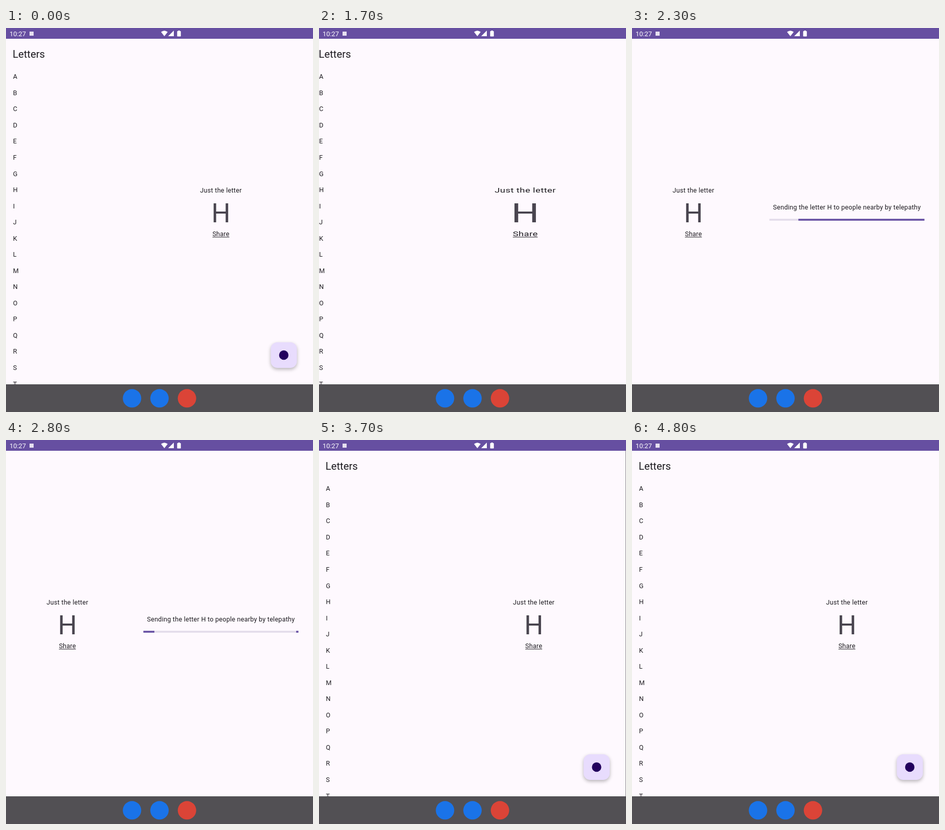
An HTML page with a canvas that plays this animation: 600x749 px, repeating every 4900 ms.

```html
<!DOCTYPE html>
<html lang="en">
<head>
<meta charset="utf-8">
<title>Letters</title>
<style>
  html, body { margin: 0; width: 100%; height: 100%; overflow: hidden; background: #fef9fe; }
  canvas { display: block; width: 600px; height: 749px; }
</style>
</head>
<body>
<canvas id="stage" width="600" height="749"></canvas>
<script>
const ctx = document.getElementById('stage').getContext('2d');

const W = 600, H = 749, TOP = 21, BOTTOM = 695;
const LIST_W = 240, DETAIL_W = 360;
const LOOP = 4900, OPEN = 1682, CLOSE = 3241;
const INK = '#1d1b20', PURPLE = '#6750a4', PAPER = '#fef9fe';
const BODY = 12.63;

// Critically damped spring: what is left of the way after ms.
function springLeft(ms) {
  const u = 20 * Math.max(0, ms) / 1000;
  return (1 + u) * Math.exp(-u);
}

function bezier(x1, y1, x2, y2) {
  const at = (a, b, s) => 3 * a * s * (1 - s) ** 2 + 3 * b * s * s * (1 - s) + s ** 3;
  return x => {
    if (x <= 0) return 0;
    if (x >= 1) return 1;
    let lo = 0, hi = 1;
    for (let i = 0; i < 24; i++) {
      const mid = (lo + hi) / 2;
      if (at(x1, x2, mid) < x) lo = mid; else hi = mid;
    }
    return at(y1, y2, lo);
  };
}

function rect(x, y, w, h, color) {
  ctx.fillStyle = color;
  ctx.fillRect(x, y, w, h);
}

function disc(x, y, r, color) {
  ctx.fillStyle = color;
  ctx.beginPath();
  ctx.arc(x, y, r, 0, 2 * Math.PI);
  ctx.fill();
}

function shape(points, color) {
  ctx.fillStyle = color;
  ctx.beginPath();
  points.forEach(([x, y]) => ctx.lineTo(x, y));
  ctx.fill();
}

function label(text, x, y, size, { color = INK, align = 'left', spacing = 0 } = {}) {
  ctx.font = `${size}px Roboto, sans-serif`;
  ctx.letterSpacing = spacing + 'px';
  ctx.textAlign = align;
  ctx.fillStyle = color;
  ctx.fillText(text, x, y);
}

function drawList(x) {
  label('Letters', x + 13, 58, 20.3);
  for (let i = 0; i < 20; i++) {
    label(String.fromCharCode(65 + i), x + 13.7, 99.3 + i * 31.54, BODY);
  }
}

function drawFab(x) {
  ctx.save();
  ctx.shadowColor = 'rgba(0, 0, 0, 0.28)';
  ctx.shadowBlur = 7;
  ctx.shadowOffsetY = 3;
  ctx.fillStyle = '#e8dcfd';
  ctx.beginPath();
  ctx.roundRect(x, 613, 51, 50, 13);
  ctx.fill();
  ctx.restore();
  disc(x + 25.4, 638, 9.2, '#22005d');
}

// Laid out at its final width, then squeezed to the width it has now.
function drawDetail(x, width, layoutWidth) {
  const mid = layoutWidth / 2;
  ctx.save();
  ctx.translate(x, 0);
  ctx.scale(width / layoutWidth, 1);
  label('Just the letter', mid, 321, BODY, { align: 'center', spacing: 0.25 });
  label('H', mid, 379, 52, { align: 'center', color: '#49454f' });
  label('Share', mid, 406, BODY, { align: 'center', spacing: 0.2 });
  rect(mid - 16.5, 407.4, 33, 1, INK);
  if (layoutWidth === DETAIL_W) drawFab(277.5);
  ctx.restore();
}

// Two runs of the progress bar: easing, delay and duration of each end.
const ends = [
  [bezier(0.2, 0, 0.8, 1), 0, 510],
  [bezier(0.4, 0, 1, 1), 333, 793],
  [bezier(0, 0, 0.65, 1), 1092, 567],
  [bezier(0.1, 0, 0.45, 1), 1267, 533]
];

function drawSending(x, ms) {
  const left = x + 28.5, width = 303, t = ms % 1800;
  label('Sending the letter H to people nearby by telepathy', x + 180, 354.3, BODY,
    { align: 'center', spacing: 0.225 });
  rect(left, 372.2, width, 3.6, '#e3dcea');
  const [head1, tail1, head2, tail2] = ends.map(([ease, delay, span]) => ease((t - delay) / span));
  for (const [tail, head] of [[tail1, head1], [tail2, head2]]) {
    if (head > tail) rect(left + tail * width, 372.2, (head - tail) * width, 3.6, PURPLE);
  }
}

function drawStatusBar() {
  rect(0, 0, W, TOP, '#664fa1');
  label('10:27', 7, 15.6, 12.8, { color: '#fff' });
  rect(46, 7, 8, 8, '#e6e0f0');
  ctx.fillStyle = '#fff';
  ctx.beginPath();
  ctx.moveTo(309.5, 16);
  ctx.lineTo(303, 7.8);
  ctx.quadraticCurveTo(309.5, 2.6, 316, 7.8);
  ctx.fill();
  shape([[317, 16], [328, 16], [328, 5]], '#fff');
  rect(336.3, 5, 3.6, 2, '#fff');
  ctx.beginPath();
  ctx.roundRect(334.5, 6, 7.2, 10.4, 1);
  ctx.fill();
}

function drawDock() {
  rect(0, BOTTOM, W, H - BOTTOM, '#525054');
  disc(246.3, 722.3, 18, '#1a73e8');
  disc(300, 722.3, 18, '#1a73e8');
  disc(353.7, 722.3, 18, '#db4437');
}

function draw(t) {
  const opened = t >= OPEN && t < CLOSE;
  // 1 shows the list and the letter, 0 the letter and its sharing.
  let f = 1;
  if (opened) f = springLeft(t - OPEN);
  else if (t >= CLOSE) f = 1 - springLeft(t - CLOSE);

  rect(0, 0, W, H, PAPER);
  if (f > 0.0005) drawList(-LIST_W * (1 - f));
  const edge = LIST_W + DETAIL_W * f;
  if (t >= OPEN && edge < W - 0.2) drawSending(edge, t - OPEN);
  drawDetail(LIST_W * f, LIST_W + 120 * f, opened ? LIST_W : DETAIL_W);

  const gap = W - edge;
  if (t >= CLOSE && gap > 0.2 && gap < 0.8) rect(W - 1, TOP, 1, BOTTOM - TOP, '#8d8a8f');

  drawStatusBar();
  drawDock();
}

const start = performance.now();
function tick() {
  draw((performance.now() - start) % LOOP);
  requestAnimationFrame(tick);
}
tick();
</script>
</body>
</html>
```
